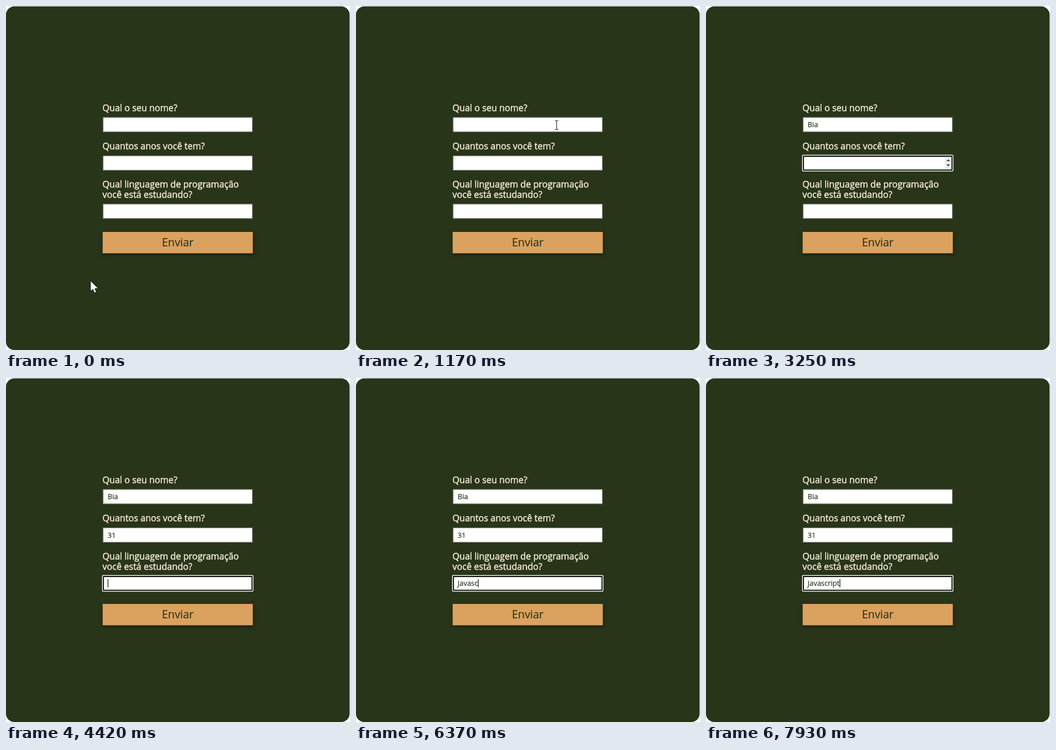
These frames come from a looping animation (667 by 667 pixels, 8000 ms). An HTML page with a canvas:

```html
<!DOCTYPE html>
<html lang="pt-BR">
<head>
<meta charset="utf-8">
<title>Formulário</title>
<style>
  html, body { margin: 0; width: 100%; height: 100%; overflow: hidden; background: #fff; }
  canvas { display: block; width: 667px; height: 667px; }
</style>
</head>
<body>
<canvas id="stage"></canvas>
<script>
const SIZE = 667, LOOP = 8000, STEP = 130, BLINK = 520;
const FONT = '"Open Sans", "Noto Sans", sans-serif';
const GREEN = '#283519', CREAM = '#f4e8d2', SAND = '#dba15f';
const LEFT = 187;

const canvas = document.getElementById('stage');
const ctx = canvas.getContext('2d');
const dpr = window.devicePixelRatio || 1;
canvas.width = canvas.height = Math.round(SIZE * dpr);

// focus: when the field is entered; first, last: first and last key press
const fields = [
  { label: ['Qual o seu nome?'], y: 216, value: 'Bia',
    focus: 1300, first: 1950, last: 2340 },
  { label: ['Quantos anos você tem?'], y: 290.5, value: '31', spinner: true,
    focus: 2730, first: 4030, last: 4160 },
  { label: ['Qual linguagem de programação', 'você está estudando?'], y: 384, value: 'Javascript',
    focus: 4420, first: 5200, last: 7500 }
];

const mix = (a, b, k) => a + (b - a) * k;
const clamp = v => Math.max(0, Math.min(1, v));
const ease = k => k * k * (3 - 2 * k);

// Typing slows down a little towards the end of the word.
function keyTime({ first, last, value }, i) {
  const k = (i / (value.length - 1)) ** 1.15;
  return Math.round(mix(first, last, k) / STEP) * STEP;
}

function typing(field, t) {
  let count = 0, since = field.focus;
  while (count < field.value.length && keyTime(field, count) <= t) {
    since = keyTime(field, count++);
  }
  const caret = Math.floor((t - since) / BLINK) % 2 === 0;
  return { str: field.value.slice(0, count), caret };
}

function text(str, x, y, size, color, weight = 0) {
  ctx.font = `${size}px ${FONT}`;
  ctx.fillStyle = color;
  ctx.fillText(str, x, y);
  if (weight) {
    ctx.strokeStyle = color;
    ctx.lineWidth = weight;
    ctx.lineJoin = 'round';
    ctx.strokeText(str, x, y);
  }
}

function box(x, y, w, h, r, color) {
  ctx.fillStyle = color;
  ctx.beginPath();
  ctx.roundRect(x, y, w, h, r);
  ctx.fill();
}

function poly(points, color) {
  ctx.beginPath();
  points.forEach(([x, y]) => ctx.lineTo(x, y));
  ctx.closePath();
  ctx.fillStyle = color;
  ctx.fill();
}

function drawSpinner(y) {
  box(463, y + 3, 13, 23, 0, '#eeeeee');
  for (const dir of [-1, 1]) {
    const base = y + 13.5 + 3 * dir;
    poly([[466, base], [473.5, base], [469.75, base + 4 * dir]], '#505050');
  }
}

function drawField(field, focused, t) {
  const { label, y, spinner } = field;
  label.forEach((line, i) => {
    text(line, LEFT, y - 12.5 - 20 * (label.length - 1 - i), 17.35, CREAM, 0.55);
  });
  if (focused) {
    box(186.3, y - 2, 293.3, 32.3, 2.5, '#fff');
    box(187.8, y - 0.5, 290.3, 29.3, 1.5, '#10160c');
    box(190, y + 2, 286, 24.5, 0, '#fff');
    if (spinner) drawSpinner(y);
  } else {
    box(187.7, y - 0.5, 290.5, 29, 0, '#85867f');
    box(189, y + 0.8, 288, 26.5, 0, '#fff');
  }
  const { str, caret } = typing(field, t);
  text(str, LEFT + 10, y + 19, 13.9, GREEN, 0.2);
  if (focused && caret) {
    box(LEFT + 10 + ctx.measureText(str).width, y + 6, 1.3, 16, 0, '#111');
  }
}

function drawButton() {
  ctx.save();
  ctx.shadowColor = 'rgba(0,0,0,.5)';
  ctx.shadowBlur = 6 * dpr;
  ctx.shadowOffsetX = dpr;
  ctx.shadowOffsetY = 2 * dpr;
  box(187.4, 438, 291.2, 41.5, 0, SAND);
  ctx.restore();
  ctx.textAlign = 'center';
  text('Enviar', 333, 466, 21.3, GREEN, 0.15);
  ctx.textAlign = 'left';
}

function drawPointer(t) {
  if (t >= fields[0].first) return;
  const now = Math.floor(t / STEP) * STEP;
  const go = ease(clamp(now / 650));
  const end = clamp((now - 650) / 260);
  ctx.save();
  ctx.translate(mix(164, 393, go) - 4 * end, mix(533, 247, go) - 16 * Math.sqrt(end));
  if (end > 0) {
    box(-0.6, -9, 1.2, 18, 0, '#222');
    for (const y of [-9, 8]) box(-3.5, y, 7, 1, 0, '#222');
  } else {
    poly([[0, 0], [0, 20], [4.5, 16], [7.5, 23], [11, 21.5], [8.2, 15], [14.5, 14.5]], '#fff');
    ctx.strokeStyle = '#141a0e';
    ctx.lineWidth = 0.8;
    ctx.stroke();
  }
  ctx.restore();
}

function draw(t) {
  ctx.setTransform(dpr, 0, 0, dpr, 0, 0);
  box(0, 0, SIZE, SIZE, 0, '#fff');
  box(0, 0.8, 666.2, 666.2, 16, GREEN);
  const active = fields.findLastIndex(f => f.focus <= t);
  fields.forEach((field, i) => drawField(field, i === active, t));
  drawButton();
  drawPointer(t);
}

const start = performance.now();
function tick() {
  draw((performance.now() - start) % LOOP);
  requestAnimationFrame(tick);
}
tick();
</script>
</body>
</html>
```
